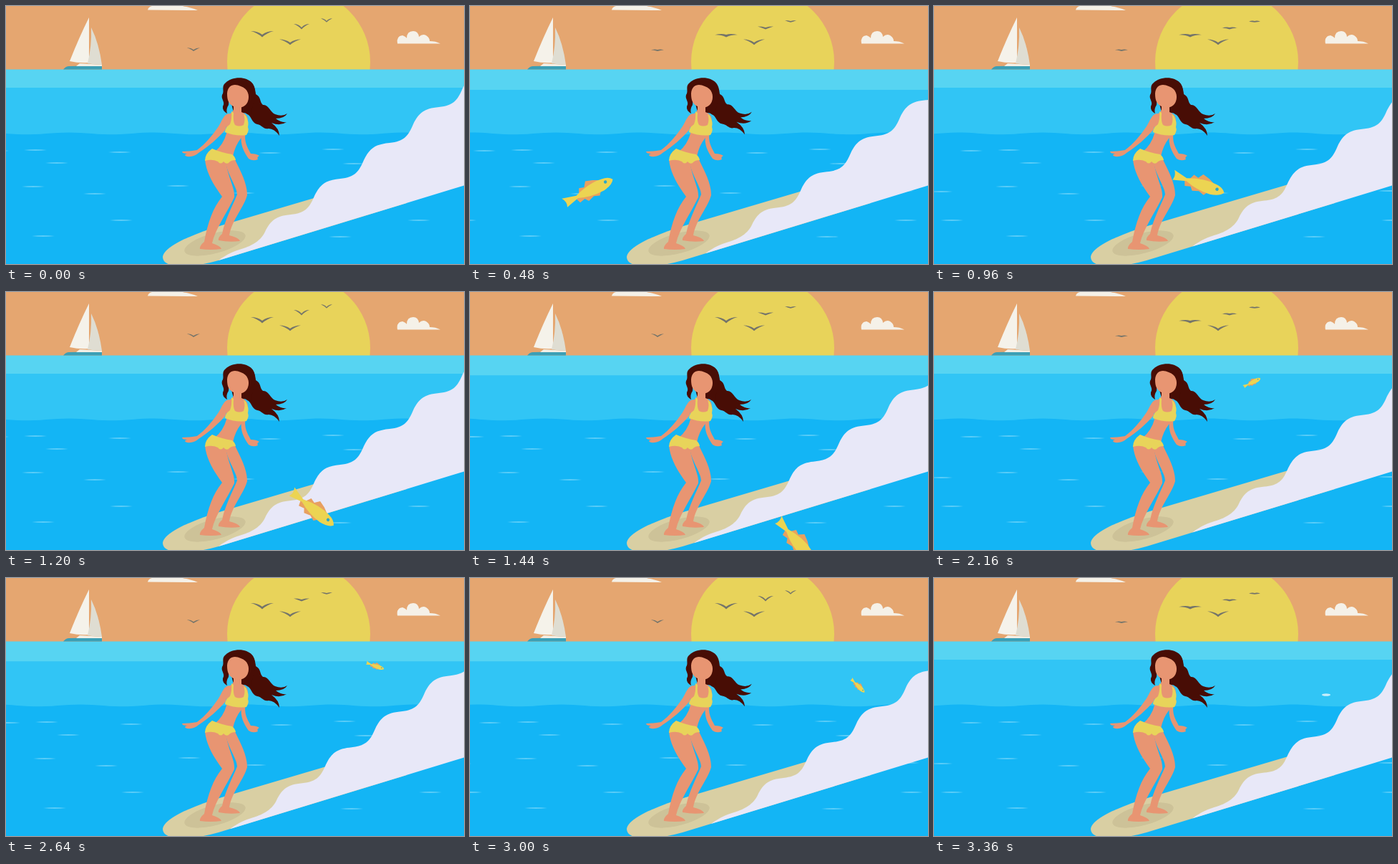
These frames come from a looping animation (640x360 px, 3.48 s). An HTML page:

```html
<!DOCTYPE html>
<html lang="en">
<head>
<meta charset="utf-8">
<title>Surfer at sunset</title>
<style>
html, body { margin: 0; height: 100%; overflow: hidden; background: #13b5f5; }
svg { display: block; width: 100vw; height: 100vh; }
.skin { fill: #e89572; }
.suit { fill: #e8d45a; }
.hair { fill: #480d05; }
</style>
</head>
<body>
<svg viewBox="0 0 640 360">
  <defs>
    <g id="fish">
      <path fill="#e8a060" d="M-14-2L-10-10-3-8 2-15 12-12 20-8 14 0ZM-20 1L-17 9-9 7-5 12 4 9 12 12 18 4Z"/>
      <path fill="#ecd452" d="M-18-2L-38-7Q-33 0-36 7L-17 2Q0 9 20 8Q34 6 38-1Q34-7 24-8Q6-11-18-2Z"/>
      <circle cx="27" cy="-2" r="2.2" fill="#2aa7c9"/>
    </g>
    <clipPath id="far"><path d="M0 0H640V163H0Z"/></clipPath>
  </defs>

  <path fill="#e5a670" d="M0 0H640V90H0Z"/>
  <circle cx="409" cy="78" r="100" fill="#e8d35a"/>
  <g fill="#f5f1e8">
    <path d="M198 5.500Q199 1 204 0V-2H244Q247 1 252 1Q261 3 268 6Z"/>
    <path d="M547 52.400Q545 42 554 41Q559 43 560 45Q560 35 569 35Q576 35 577 43Q582 38 587 41Q592 44 592 49Q600 49 607 52.400Z"/>
  </g>
  <g id="birds" fill="#74746a"></g>

  <path fill="#57d4f2" d="M0 88.400H640V180H0Z"/>
  <g>
    <path fill="#3b9fb6" d="M80 88.400Q84 84 88 84L134 83V88.400Z"/>
    <path fill="#f1eee5" d="M103 80L134 82V84H98Z"/>
    <path fill="#f5f2ea" d="M116 16Q102 44 89 77Q102 80 116 79Z"/>
    <path fill="#dfddd2" d="M119 30Q130 52 134 82Q124 82 114 80Q120 56 119 30Z"/>
  </g>
  <path id="mid" fill="#31c5f5"/>
  <path id="deep" fill="#13b5f5"/>
  <g id="ripples" fill="#5bcdf8"></g>
  <g clip-path="url(#far)"><use id="small" href="#fish"/></g>
  <ellipse id="splash" cx="548" cy="163" rx="6" ry="1.700" fill="#c8eefb"/>

  <path fill="#d9cfa3" d="M219 350C221 335 262 318 300 306.500L500 247.500 560 275 297 355Q262 365 235 362Q219 360 219 350Z"/>
  <ellipse cx="292" cy="331" rx="44" ry="14" transform="rotate(-15 292 331)" fill="#cdc298"/>
  <path id="foam" fill="#e8e8f8"/>

  <!-- Surfer -->
  <g>
    <g class="hair">
      <path id="locks" d="M335 103C349 106 347 118 349 123C357 127 354 134 359 138C367 137 369 148 376 151Q386 155 393 150Q389 157 377 157Q384 163 392 162Q383 168 371 163Q382 171 382 181Q375 171 367 171C360 173 358 166 351 165C343 163 343 153 337 151L329 145Z"/>
      <path d="M318 148L342 150 349 123C348 113 346 106 336 102C326 98 313 101 307 107C300 112 306 119 302 124C300 130 307 134 303 140Q302 146 309 150Q307 144 311 138L312 125Z"/>
    </g>
    <g class="skin">
      <path d="M333 153C338 158 337 168 335 176C332 188 337 197 342 206Q350 206 354 209Q350 211 352 214Q345 217 339 213C332 203 327 193 329 180Z"/>
      <path d="M318 138H329V148Q339 151 338 164Q336 176 328 185Q320 195 317 210L292 203Q304 193 308 178L308 152Q317 150 318 144Z"/>
      <path d="M312 150C304 151 302 160 297 168C288 181 279 192 267 201Q256 203 246 203Q246 206 253 206Q247 208 253 210Q263 211 269 205C283 196 297 184 307 172Z"/>
      <path d="M306 214C309 236 322 250 323 263C316 280 306 298 302 318Q296 323 297 327Q312 330 327 328Q325 323 312 320C316 298 332 282 337 264C337 245 326 228 319 212Z"/>
      <path d="M278 214C280 235 292 252 302 266C289 282 282 302 277 329Q270 335 271 339Q286 341 301 339Q300 335 288 331C292 312 308 290 319 267C320 252 309 238 307 214Z"/>
      <path d="M309 122C310 109 320 108 328 112C338 115 341 125 338 133C335 142 324 144 316 139C310 135 309 129 309 122Z"/>
    </g>
    <g class="suit">
      <path d="M315 147L318 149Q317 162 320 166Q326 169 332 166Q335 157 332 151L335 153Q340 162 338 169Q340 174 336 180Q321 182 306 176Q306 170 313 165Q316 157 315 147Z"/>
      <path d="M288 199Q302 205 316 207Q320 210 321 215Q314 215 311 219Q307 221 304 217Q300 222 296 217Q288 213 278 216Q278 206 288 199Z"/>
    </g>
  </g>
  <use id="big" href="#fish"/>
</svg>
<script>
const LOOP = 3480, STEP = 120, SURF = 1200;
const $ = id => document.getElementById(id);
const place = (el, x, y, angle, size) =>
  el.setAttribute('transform', `translate(${x} ${y}) rotate(${angle}) scale(${size})`);

// x, y, half span, flap offset
const birds = [[358, 40, 16, .2], [397, 51, 15, 0], [413, 30, 11, .1],
  [448, 21, 8, .1], [262, 61, 9, .2]];
const ripples = [[-54, 259], [-39, 299], [-12, 202], [41, 201], [71, 219], [159, 204],
  [38, 252], [124, 262], [161, 299], [52, 321], [240, 251], [332, 261], [369, 205],
  [457, 200], [486, 220], [467, 322], [577, 299], [572, 258]];

$('birds').innerHTML = birds.map(([x, y]) => `<path transform="translate(${x} ${y})"/>`).join('');
$('ripples').innerHTML = ripples.map(([x, y]) =>
  `<path d="M${x - 16} ${y}q16-2 32 0q-16 2-32 0"/>`).join('');
$('foam').setAttribute('d', 'M297 355c12-9 22-13 32-16s26-9 33-24' +
  'c8-16 15-22 36-24s26-10 33-26'.repeat(5) + 'V230Z');

function flap(i, phase) {
  const [, , w, offset] = birds[i];
  const swing = Math.cos(2 * Math.PI * (2 * phase - offset));
  const tip = i == 1 ? -4.5 : -w / 15 * (3.3 + 4.5 * swing);
  const bend = Math.min(tip, -w / 8), thick = w / 4.5;
  $('birds').children[i].setAttribute('d',
    `M${-w} ${tip}Q${-w * .4} ${bend} 0 0Q${w * .4} ${bend} ${w} ${tip}` +
    `Q${w * .45} ${bend + 2} 0 ${thick}Q${-w * .45} ${bend + 2} ${-w} ${tip}Z`);
}

// One leap; dt is the time from its highest point
function leap(el, dt, x, y, size) {
  const dx = dt < 0 ? .46 * dt : 195 * Math.tanh(dt / 460);
  const dy = 2e-5 * Math.abs(dx) ** 3 + .2 * Math.max(0, dt - 720);
  const angle = .035 * Math.sign(dx) * Math.abs(dx) ** 1.4;
  place(el, x + dx * size, y + dy * size, angle, size);
  el.style.display = dt > -700 && dt < 960 ? '' : 'none';
}

function draw(t) {
  const phase = t % SURF / SURF, shift = 80 * phase;
  $('ripples').setAttribute('transform', `translate(${shift})`);
  $('foam').setAttribute('transform', `translate(${shift} ${-.303 * shift})`);

  const band = 114 + 3 * Math.sin(Math.PI * Math.min(1, phase / .7));
  $('mid').setAttribute('d', `M0 ${band}H640V180H0Z`);
  let crest = 'M0 360';
  for (let x = 0; x <= 640; x += 8)
    crest += `L${x} ${177.9 - 1.4 * Math.cos(2 * Math.PI * (x - 88 - shift) / 117)}`;
  $('deep').setAttribute('d', crest + 'V360Z');

  birds.forEach((_, i) => flap(i, phase));
  const sway = -2.5 * Math.max(0, Math.sin(2 * Math.PI * (phase - .2)));
  $('locks').setAttribute('transform', `rotate(${sway} 342 130)`);

  leap($('big'), t - 720, 276, 232, 1);
  leap($('small'), t - 2400, 483, 117, .35);
  $('splash').style.display = t >= 3240 ? '' : 'none';
}

function tick(now) {
  draw(Math.floor(now % LOOP / STEP) * STEP);
  requestAnimationFrame(tick);
}
tick(0);
</script>
</body>
</html>
```
